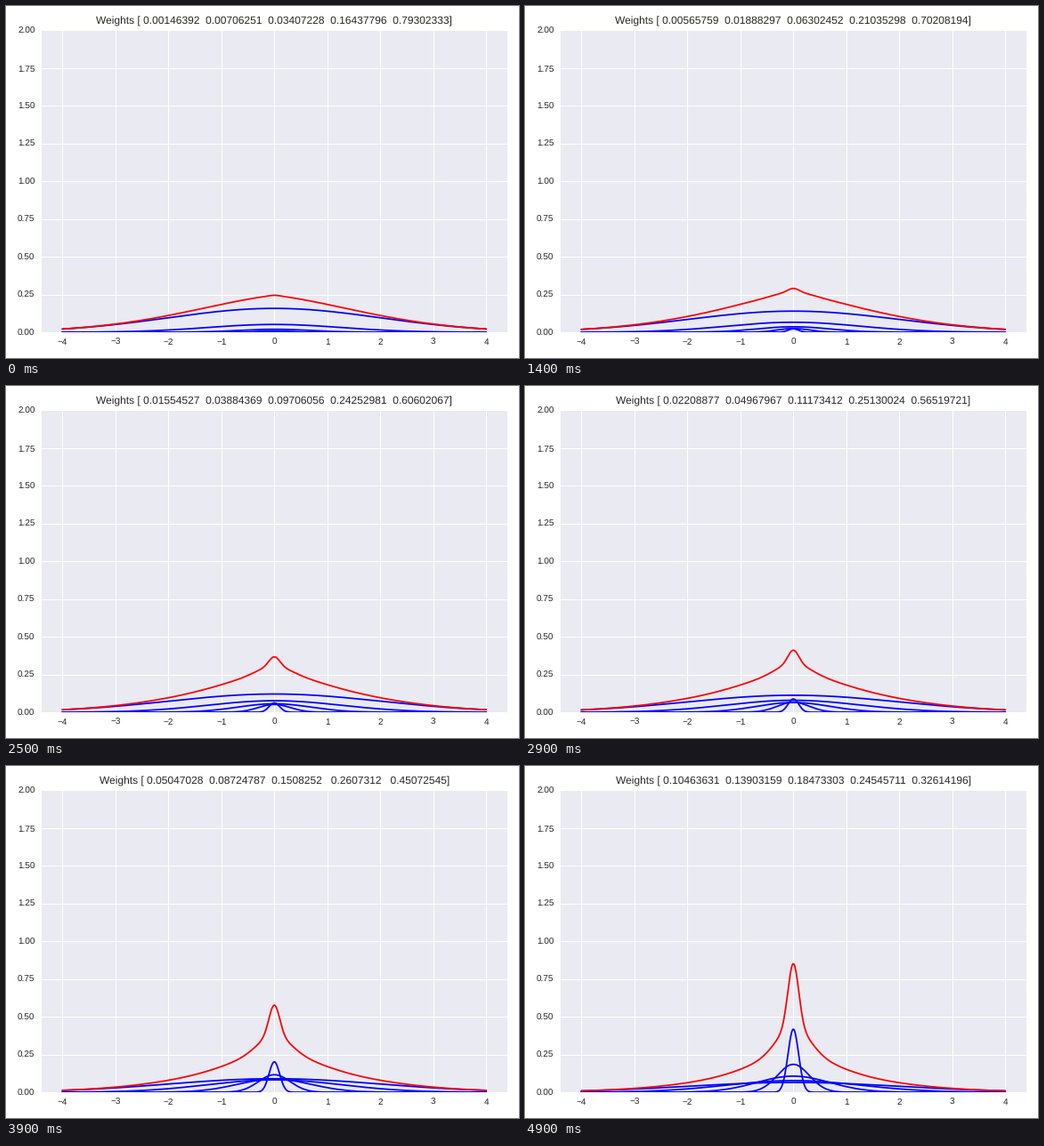
Recreate the animation shown at these times as a matplotlib script. Size 576 by 396 pixels, loop 5000 ms.

```python
import numpy as np
import matplotlib.pyplot as plt
from matplotlib.animation import FuncAnimation

WIDTH, HEIGHT, DPI = 576, 396, 72
FRAMES, INTERVAL = 50, 100
SIGMAS = np.array([0.1, 0.3, 0.69, 1.265, 2.0])
INK = "0.15"

plt.rcParams.update({
    "font.family": "Liberation Sans",
    "font.size": 10,
    "text.color": INK,
    "text.hinting": "none",
    "axes.facecolor": "#EAEAF2",
    "axes.axisbelow": True,
    "grid.color": "white",
    "grid.linewidth": 1,
    "lines.linewidth": 1.75,
    "lines.solid_capstyle": "round",
})

x = np.linspace(-4, 4, 1001)
densities = np.exp(-0.5 * (x / SIGMAS[:, None]) ** 2) / (
    SIGMAS[:, None] * np.sqrt(2 * np.pi))


def mixture_weights(frame):
    """Softmax over the component index, flattening over time."""
    slope = (59.8 - frame) / 38
    w = np.exp(slope * np.arange(len(SIGMAS)))
    return w / w.sum()


def weights_label(weights):
    numbers = (f"{w:.8f}".rstrip("0").ljust(10) for w in weights)
    return "Weights [ " + "  ".join(numbers) + "]"


fig = plt.figure(figsize=(WIDTH / DPI, HEIGHT / DPI), dpi=DPI, facecolor="white")
left, right, bottom, top = 39.5, 563.04, 367.04, 27.35
ax = fig.add_axes([left / WIDTH, 1 - bottom / HEIGHT,
                   (right - left) / WIDTH, (bottom - top) / HEIGHT])
ax.set(xlim=(-4.4, 4.4), ylim=(0, 2),
       xticks=np.arange(-4, 5), yticks=np.arange(0, 2.1, 0.25))
ax.grid(True)
ax.tick_params(length=0, pad=7, labelsize=10, labelcolor=INK)
for spine in ax.spines.values():
    spine.set_visible(False)

title = ax.set_title("", fontsize=12, pad=6.35)
components = [ax.plot([], [], color="blue")[0] for _ in SIGMAS]
total, = ax.plot([], [], color="red")


def update(frame):
    weights = mixture_weights(frame)
    curves = weights[:, None] * densities
    for line, curve in zip(components, curves):
        line.set_data(x, curve)
    total.set_data(x, curves.sum(axis=0))
    title.set_text(weights_label(weights))
    return [*components, total, title]


anim = FuncAnimation(fig, update, frames=FRAMES, interval=INTERVAL,
                     repeat=True, repeat_delay=0)
plt.show()
```
